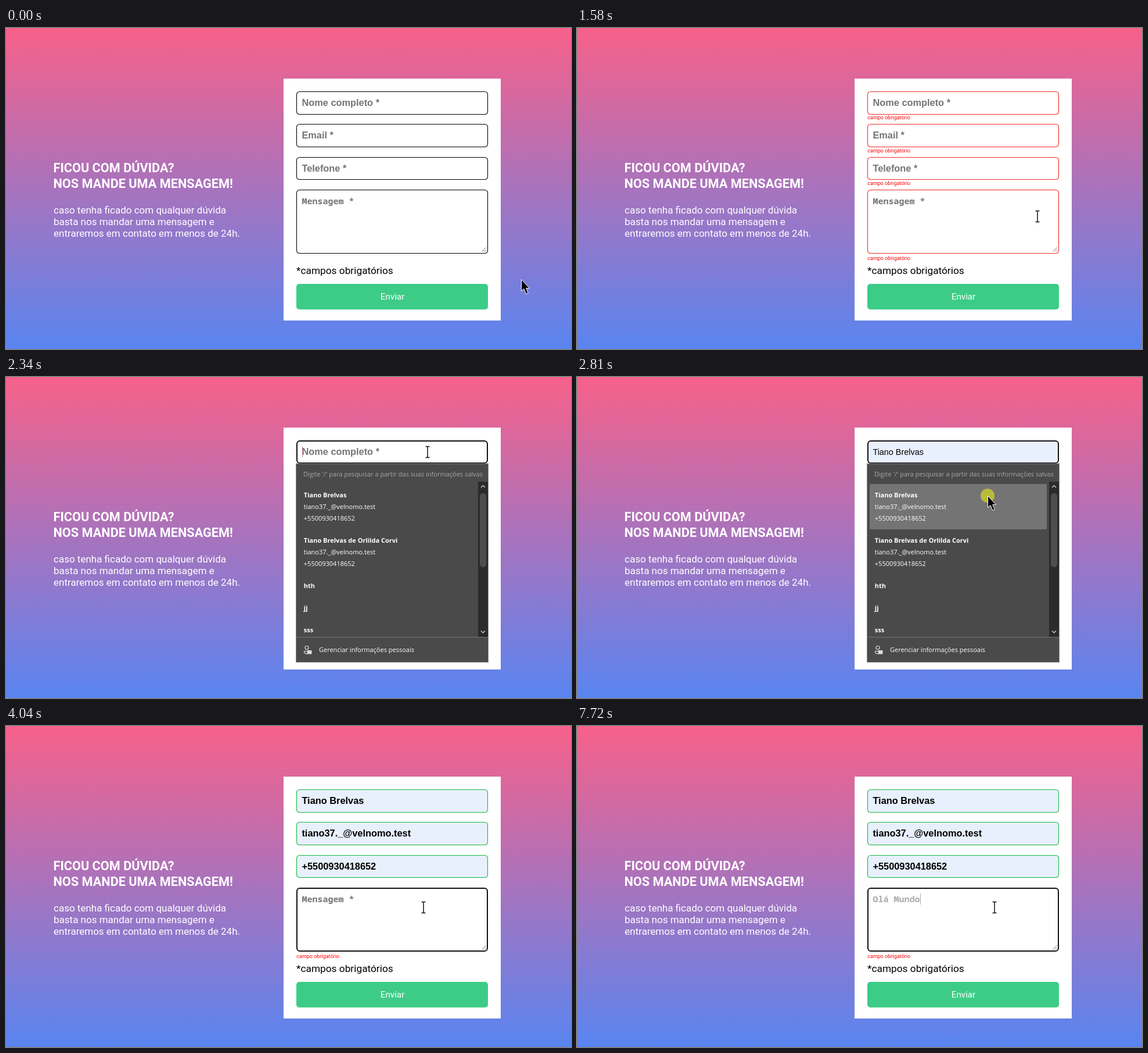
An HTML page that plays this animation: 973 px wide and 552 px high, repeating every 8000 ms.

```html
<!DOCTYPE html>
<html lang="pt-BR">
<head>
<meta charset="utf-8">
<title>Formulário de contato</title>
<style>
  html, body { margin: 0; width: 100%; height: 100%; overflow: hidden; }
  body { background: linear-gradient(#f7618a, #5985f0); }
  svg { display: block; width: 973px; height: 552px; }
  text { white-space: pre; }
  .roboto { font-family: Roboto, sans-serif; font-size: 17px; }
  .white { fill: #fff; }
  .title { font-size: 21.7px; font-weight: 700; }
  .note { font-size: 17.3px; }
  .send { font-size: 15.2px; text-anchor: middle; }
  .error { font: 9px Roboto, sans-serif; fill: #f00; }
  .field { fill: #fff; stroke: #000; stroke-width: 1.1; }
  .field.invalid { stroke: #f22a2a; }
  .field.valid { stroke: #14b840; }
  .field.filled { fill: #e8f0fe; }
  .field.focus { stroke: #101014; stroke-width: 2; }
  .value { font: 700 16.36px "Liberation Sans", Arial, sans-serif; fill: #000; }
  .value.preview { font-weight: 400; font-size: 14.4px; }
  .value.mono { font: 700 15px "Noto Sans Mono", monospace; fill: #aaa; }
  .value.empty { fill: #757575; }
  .menu text { font: 11px "Open Sans", "Noto Sans", sans-serif; fill: #fff; }
  .menu .bold { font-weight: 700; }
  .menu .hint { fill: #a8a8a8; }
  .line { fill: none; stroke: #ddd; stroke-width: 1.2; }
</style>
</head>
<body>
<svg viewBox="0 0 973 552">
  <g class="roboto white">
    <text class="title" x="81.500" y="248">FICOU COM DÚVIDA?</text>
    <text class="title" x="81.500" y="275">NOS MANDE UMA MENSAGEM!</text>
    <text x="82" y="319">caso tenha ficado com qualquer dúvida</text>
    <text x="82" y="339">basta nos mandar uma mensagem e</text>
    <text x="82" y="359">entraremos em contato em menos de 24h.</text>
  </g>

  <rect x="478" y="87" width="374" height="416" fill="#fff"/>
  <g id="fields"></g>
  <path d="M819.5 384.5l7-7M823.5 384.5l3-3" stroke="#777" fill="none"/>
  <text class="roboto note" x="500" y="423">*campos obrigatórios</text>
  <rect x="500" y="440" width="330" height="44" rx="5" fill="#3dcc87"/>
  <text class="roboto white send" x="665.5" y="467">Enviar</text>
  <rect id="caret" width="1" height="19"/>

  <g id="menu" class="menu">
    <rect x="499.5" y="149" width="331" height="341.5" fill="#4a4a4a" stroke="#8c8c8c"/>
    <text class="hint" x="512" y="171">Digite '/' para pesquisar a partir das suas informações salvas</text>
    <rect id="hover" x="504" y="184" width="305" height="78" rx="2" fill="#747474"/>
    <g id="items"></g>
    <rect x="813" y="180" width="17" height="267" fill="#2b2b2b"/>
    <rect x="816" y="200" width="11" height="127" rx="5" fill="#4e4e4e"/>
    <path class="line" d="M818 190l3.5-3.5 3.5 3.5M818 436.500l3.500 3.500 3.500-3.500"/>
    <path d="M500 447.500h330" stroke="#777"/>
    <circle class="line" cx="518" cy="465.500" r="3"/>
    <path class="line" d="M518 471.500h-4.500v1.500q1 3 5 3.300"/>
    <rect x="518.500" y="470" width="8" height="6.500" rx="1" fill="#ddd"/>
    <text x="539" y="473">Gerenciar informações pessoais</text>
  </g>

  <circle id="press" r="12" fill="#ff0" opacity=".5"/>
  <path id="arrow" d="M.5.5V20.500L5 16.500 8.600 25.300 12.200 23.800 8.700 15.400H14.600Z" fill="#000" stroke="#fff"/>
  <path id="beam" d="M-3.500-9.500h2.500l1 1 1-1h2.500M0-8.500V8.500M-3.500 9.500h2.500l1-1 1 1h2.500" fill="none" stroke="#111" stroke-width="1.500"/>
</svg>

<script>
const LOOP = 8000, TICK = 200 / 3;
const INVALID = 950, FOCUS = 2270, OPEN = 2340, HOVER = 2680, FILL = 2880, MESSAGE = 3510;

const name = "Tiano Brelvas", mail = "tiano37._@velnomo.test", phone = "+5500930418652";
const fields = [
  { y: 109, h: 40, base: 134, err: 157, hint: "Nome completo *", value: name },
  { y: 165, h: 40, base: 190, err: 214, hint: "Email *", value: mail },
  { y: 222, h: 39, base: 247, err: 270, hint: "Telefone *", value: phone },
  { y: 278, h: 110, base: 303, err: 399, hint: "Mensagem *", mono: true }
];
const items = [
  [207, name, 1], [227, mail], [247, phone],
  [285, name + " de Orlilda Corvi", 1], [305, mail], [325, phone],
  [363, "hth", 1], [401, "jj", 1], [439, "sss", 1]
];

// time, x, y of the pointer
const track = [
  [330, 887, 432], [740, 801, 449], [1250, 801, 449], [1700, 788, 250],
  [1900, 764, 183], [2067, 733, 141], [2200, 726, 129], [2420, 726, 129],
  [2730, 707, 204], [2885, 707, 204], [3240, 715, 296], [3400, 719, 312]
];
const presses = [[820, 890], [FOCUS, OPEN], [2810, FILL], [MESSAGE, 3580]];

// one time per typed letter
const message = "Olá Mundo";
const keys = [4970, 5170, 5770, 5920, 6920, 7190, 7320, 7510, 7720];

const $ = id => document.getElementById(id);
const show = (node, on) => node.style.display = on ? "" : "none";
const move = (node, x, y) => node.setAttribute("transform", `translate(${x} ${y})`);
const within = (t, a, b) => t >= a && t < b;
const classes = (...list) => list.filter(Boolean).join(" ");

function set(node, attrs) {
  for (const key in attrs) node.setAttribute(key, attrs[key]);
  return node;
}

function add(parent, tag, attrs, text = "") {
  const node = set(document.createElementNS("http://www.w3.org/2000/svg", tag), attrs);
  node.textContent = text;
  return parent.appendChild(node);
}

for (const f of fields) {
  f.box = add($("fields"), "rect", { rx: 5 });
  f.text = add($("fields"), "text", { x: 509.4, y: f.base });
  f.error = add($("fields"), "text", { class: "error", x: 500.3, y: f.err }, "campo obrigatório");
}
for (const [y, text, bold] of items)
  add($("items"), "text", { x: 512.8, y, class: bold ? "bold" : "" }, text);

function drawField(f, i, t, typed) {
  const filled = !f.mono && t >= FILL;
  const preview = i === 0 && within(t, HOVER, FILL);
  const focus = i === 0 ? within(t, FOCUS, MESSAGE) : f.mono && t >= MESSAGE;
  const invalid = t >= INVALID && !filled;
  const inset = focus ? 1 : 0.5;
  const value = f.mono ? typed : (filled || preview) && f.value;

  set(f.box, {
    class: classes("field", invalid && "invalid", filled && "valid", (filled || preview) && "filled", focus && "focus"),
    x: 500 + inset, y: f.y + inset, width: 330 - 2 * inset, height: f.h - 2 * inset
  });
  set(f.text, { class: classes("value", f.mono && "mono", preview && "preview", !value && "empty") });
  f.text.textContent = value || f.hint;
  show(f.error, invalid);
}

function drawCaret(t, count) {
  const inName = within(t, FOCUS, HOVER);
  const start = count ? keys[count - 1] : MESSAGE;
  show($("caret"), inName || t >= MESSAGE && Math.floor((t - start) / 530) % 2 === 0);
  set($("caret"), { x: 510 + 9 * count, y: inName ? 119 : 288, fill: inName ? "#d08a96" : "#aaa" });
}

function pointerAt(t) {
  const q = Math.floor((t + 2) / TICK) * TICK;
  const i = track.findIndex(p => p[0] > q);
  if (i < 0) return track[track.length - 1].slice(1);
  if (i === 0) return track[0].slice(1);
  const [t0, x0, y0] = track[i - 1], [t1, x1, y1] = track[i];
  const k = (q - t0) / (t1 - t0);
  return [Math.round(x0 + (x1 - x0) * k), Math.round(y0 + (y1 - y0) * k)];
}

function drawPointer(t, open) {
  const [x, y] = pointerAt(t);
  const inField = fields.some((f, i) => within(y, f.y, f.y + f.h) && (!open || i === 0));
  show($("beam"), inField);
  show($("arrow"), !inField);
  show($("press"), presses.some(([a, b]) => within(t, a, b)));
  for (const id of ["beam", "arrow", "press"]) move($(id), x, y);
}

function render() {
  const t = performance.now() % LOOP;
  const open = within(t, OPEN, FILL);
  const count = keys.filter(k => t >= k).length;
  fields.forEach((f, i) => drawField(f, i, t, message.slice(0, count)));
  show($("menu"), open);
  show($("hover"), t >= HOVER);
  drawCaret(t, count);
  drawPointer(t, open);
  requestAnimationFrame(render);
}
render();
</script>
</body>
</html>
```
